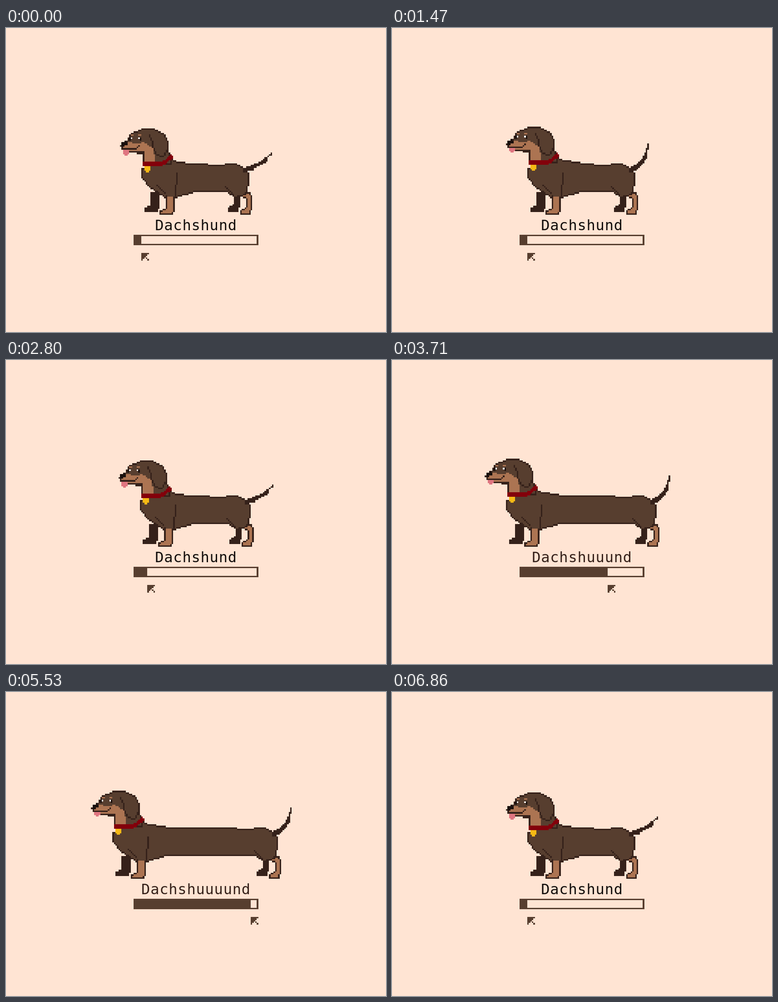
An HTML page with a canvas that plays this animation: 837x669 px, repeating every 6930 ms.

```html
<!DOCTYPE html>
<html lang="en">
<head>
<meta charset="utf-8">
<title>Dachshund</title>
<style>
  html, body { margin: 0; height: 100%; overflow: hidden; background: #ffe4d3; }
  canvas { display: block; width: 100vw; height: 100vh; image-rendering: pixelated; }
  p {
    position: absolute; top: 415px; width: 100%; margin: 0; text-align: center;
    font: 32px/38px 'DejaVu Sans Mono', monospace; letter-spacing: .8px;
  }
</style>
</head>
<body>
<canvas id="stage" width="250" height="200"></canvas>
<p id="label"></p>
<script>
const ctx = document.getElementById('stage').getContext('2d');
const label = document.getElementById('label');
const BG = '#ffe4d3', FUR = '#573e2f', DARK = '#35211a', TAN = '#ac7452',
      BLACK = '#1a100d', RED = '#83000b', GOLD = '#f6b915', PINK = '#df7580';
const STEP = 70, STEPS = 99;

const points = path => path.split(' ').map(p => p.split(',').map(Number));

function rect(color, x, y, w = 1, h = 1) {
  ctx.fillStyle = color;
  ctx.fillRect(x, y, w, h);
}

function line(color, path) {
  const pts = points(path);
  for (let i = 1; i < pts.length; i++) {
    const [x, y] = pts[i - 1], dx = pts[i][0] - x, dy = pts[i][1] - y;
    const len = Math.max(Math.abs(dx), Math.abs(dy));
    for (let k = 0; k <= len; k++)
      rect(color, Math.round(x + dx * k / len), Math.round(y + dy * k / len));
  }
}

// Filled polygon without smoothing, with a one-cell edge
function shape(fill, edge, path) {
  const pts = points(path), ys = pts.map(p => p[1]);
  for (let y = Math.min(...ys); y < Math.max(...ys); y++) {
    const xs = [];
    pts.forEach(([x0, y0], i) => {
      const [x1, y1] = pts[(i + 1) % pts.length];
      if ((y0 <= y) !== (y1 <= y)) xs.push(x0 + (y - y0) * (x1 - x0) / (y1 - y0));
    });
    xs.sort((a, b) => a - b);
    for (let i = 0; i < xs.length; i += 2) {
      const left = Math.ceil(xs[i]);
      rect(fill, left, y, Math.floor(xs[i + 1]) - left + 1, 1);
    }
  }
  line(edge, path + ' ' + path.split(' ')[0]);
}

function at(x, y, draw) {
  ctx.save();
  ctx.translate(x, y);
  draw();
  ctx.restore();
}

const foreLeg = fill => shape(fill, DARK, '105,110 110,110 110,119 109,122 101,122 101,120 105,118');
const hindLeg = fill => shape(fill, DARK, '154,109 160,108 161,111 161,117 160,122 154,122 154,120 158,117 158,112');

// A tapering curve that lifts with the head
function tail(bob) {
  const bend = (a, b, c, t) => (1 - t) ** 2 * a + 2 * t * (1 - t) * b + t * t * c;
  for (let t = 0; t <= 1; t += .02) {
    const w = t < .2 ? 3 : t < .7 ? 2 : 1;
    rect(DARK, Math.round(bend(156, 168 - 1.5 * bob, 174 - 6 * bob, t)),
      Math.round(bend(92, 89 - bob, 82 - 6 * bob, t)), w > 1 ? 2 : 1, w);
  }
}

function hind(bob) {
  at(-8, -2, () => hindLeg(DARK));
  hindLeg(TAN);
  shape(FUR, DARK, '133,90 143,90 144,89 151,89 155,91 159,95 159,101 157,109 150,111 145,107 133,107');
  line(DARK, '144,104 149,109');
  tail(bob);
}

function fore() {
  at(-10, -2, () => foreLeg(DARK));
  shape(FUR, DARK, '89,92 94,90 124,89 124,107 111,111 106,112 94,104 89,98');
  foreLeg(TAN);
  rect(FUR, 106, 108, 5, 3);
  line(DARK, '112,95 112,102 111,103 111,111');
  line(DARK, '99,103 104,108');
}

function head(bob) {
  // Nape and neck
  shape(FUR, FUR, '94,91 109,86 113,88 123,89 123,94');
  line(DARK, '109,86 113,88 123,89');
  shape(FUR, DARK, '90,80 105,78 108,85 108,89 90,89');

  // Skull and ear, then face, muzzle and throat
  const skull = '79,74 82,69 90,66 97,66 103,69 106,74 106,79 103,84 99,83 96,78 96,75 94,70';
  shape(FUR, FUR, '80,72 94,70 96,78 80,75');
  shape(TAN, TAN, '77,78 80,75 86,76 90,75 96,79 97,87 91,87 91,79');
  shape(FUR, FUR, skull);
  line(DARK, skull);
  rect(TAN, 81, 80, 10);
  rect(DARK, 81, 81, 9);
  rect(DARK, 86, 82, 4);
  line(DARK, '75,77 76,79 85,79 87,77');
  shape(BLACK, BLACK, '76,75 78,74 79,76 76,77');

  for (const x of [82, 87]) {
    rect(TAN, x, 70, 2);
    rect('#fff', x, 72);
    rect(BLACK, x + (x > 82 ? 1 : -1), 72, 1, 2);
  }

  rect(PINK, 77, 80, 4, 3 - bob);
  rect(PINK, 78, 82 - bob, 2, 2);

  shape(RED, RED, '90,88 101,88 105,86 108,83 109,85 102,90 90,90');
  rect(GOLD, 91, 91, 4, 3);
  rect(GOLD, 92, 94, 2);
}

function slider(s) {
  const end = Math.round(89 + 3.8 * s);
  rect(FUR, 84, 136, 82, 7);
  rect(BG, end, 137, 165 - end, 5);
  for (let y = 0; y < 5; y++)
    for (let x = 0; x < 5; x++)
      if (x + y < 5 || x === y) rect(FUR, end + x, 148 + y);
}

function frame() {
  const n = Math.floor(performance.now() / STEP) % STEPS;
  // The wag skips its doubled rest pose when the slider stops and turns back
  const phase = (n + (n > 59) + (n > 78)) % 5;
  const bob = Math.min(phase, 4 - phase);
  const s = Math.max(0, Math.min(20, n - 39, 98 - n));
  const extra = Math.floor(s / 5);

  rect(BG, 0, 0, 250, 200);
  at(s, 0, () => hind(bob));
  at(-s, 0, fore);
  const x = 123 - s, w = 11 + 2 * s;
  rect(FUR, x, 90, w, 17);
  rect(DARK, x, 89, w);
  rect(DARK, x, 107, w);
  rect(BG, 133 + s, 89);
  rect(DARK, 133 + s, 90);
  at(-s, -bob, () => head(bob));
  slider(s);

  label.textContent = 'Dachsh' + 'u'.repeat(1 + extra) + 'nd';
  label.style.color = extra ? DARK : '#120e0c';
  requestAnimationFrame(frame);
}
frame();
</script>
</body>
</html>
```
